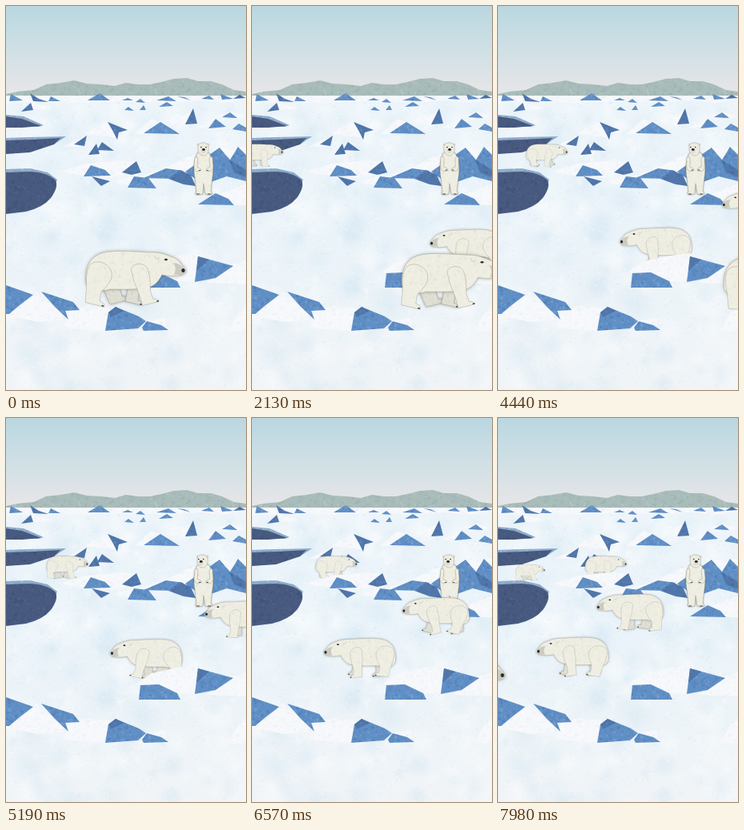
Animation of 300 by 480 pixels, one loop 8 s. Source, as an HTML page with a canvas:

```html
<!DOCTYPE html>
<html lang="en">
<head>
<meta charset="utf-8">
<title>Bears on the ice</title>
<style>
html, body { margin: 0; height: 100%; overflow: hidden; background: #edf3f8; }
canvas { display: block; }
</style>
</head>
<body>
<canvas id="stage" width="300" height="480"></canvas>
<script>
const W = 300, H = 480, LOOP = 8000, STEP = 30, STRIDE = 1060;
const ctx = document.getElementById('stage').getContext('2d');

let seed = 7;
const rand = () => (seed = (seed * 16807) % 2147483647) / 2147483647;

function layer(w = W, h = H) {
  const c = document.createElement('canvas');
  c.width = w;
  c.height = h;
  return c.getContext('2d');
}

// Mottled paper in one colour
function paper(color, light, dark, strength) {
  const g = layer(96, 96);
  g.fillStyle = color;
  g.fillRect(0, 0, 96, 96);
  for (let i = 0; i < 900; i++) {
    g.globalAlpha = strength * rand();
    g.fillStyle = rand() < 0.5 ? light : dark;
    g.beginPath();
    g.ellipse(rand() * 96, rand() * 96, 0.5 + rand() * 2, 0.5 + rand() * 1.4, rand() * 3, 0, 7);
    g.fill();
  }
  return ctx.createPattern(g.canvas, 'repeat');
}

const blue = paper('#608fc5', '#8eb3dc', '#416ca4', 0.35);
const navy = paper('#5076aa', '#7097c6', '#3b5c8c', 0.35);
const white = paper('#f6f8fb', '#ffffff', '#e4eaf2', 0.35);
const water = paper('#485a7f', '#5e7095', '#374869', 0.3);
const rim = paper('#8dabca', '#b9d0e4', '#6f93ba', 0.35);
const rock = paper('#a8bcba', '#c0cdc8', '#8ca5a7', 0.4);
const fur = paper('#efeee3', '#faf9f1', '#d9d6c4', 0.3);
const shadedFur = paper('#e0dfd4', '#efeee5', '#c8c6b8', 0.3);

function fill(g, style, path) {
  g.fillStyle = style;
  g.fill(new Path2D(path));
}

const back = layer(), middle = layer(), near = layer();

function paintBackground(g) {
  const sky = g.createLinearGradient(0, 0, 0, 112);
  sky.addColorStop(0, '#b9d7e1');
  sky.addColorStop(0.5, '#d0e0e5');
  sky.addColorStop(1, '#e8e6e8');
  g.fillStyle = sky;
  g.fillRect(0, 0, W, 113);
  fill(g, rock, 'M0 110L14 107 35 105 50 98 68 96 85 93 101 97 120 98 136 100 150 96 165 98 180 98 194 95 210 91 226 90 240 94 256 94 270 98 285 105 300 107V114H0Z');

  const snow = g.createLinearGradient(0, 112, 0, H);
  snow.addColorStop(0, '#edf5fa');
  snow.addColorStop(0.4, '#e9f3f9');
  snow.addColorStop(1, '#f0f4f7');
  g.fillStyle = snow;
  g.fillRect(0, 112, W, H - 112);
  for (let i = 0; i < 260; i++) {
    const x = rand() * W, y = 125 + rand() * 355, r = 5 + rand() * 20;
    const tone = rand() < 0.55 ? '255,255,255' : '208,228,241';
    const spot = g.createRadialGradient(x, y, 0, x, y, r);
    spot.addColorStop(0, `rgba(${tone},.3)`);
    spot.addColorStop(1, `rgba(${tone},0)`);
    g.fillStyle = spot;
    g.fillRect(x - r, y - r, 2 * r, 2 * r);
  }
  for (let i = 0; i < 2200; i++) {
    g.fillStyle = rand() < 0.5 ? 'rgba(255,255,255,.3)' : 'rgba(190,208,222,.16)';
    g.fillRect(rand() * W, 114 + rand() * 366, 1 + rand() * 2, 1 + rand());
  }

  fill(g, rim, 'M0 136L22 138 47 149 40 151 0 150ZM0 165L28 164 75 163 60 173 0 178ZM0 204L30 203 52 208 64 217 60 226 0 222Z');
  fill(g, water, 'M0 138L20 141 44 150 20 152 0 152ZM0 168L32 167 68 165 60 173 45 178 30 183 0 185ZM0 208L30 207Q52 208 62 218Q66 226 56 240Q46 252 25 257L0 260Z');

  fill(g, white, 'M0 113H300V117L270 121 240 118 205 121 160 119 100 121 60 120 0 121ZM22 131L31 120 60 128ZM98 160L126 145 150 153 140 165ZM160 160L182 141 200 149 214 160ZM205 146L234 131 226 149ZM238 152L262 140 256 154ZM70 176L100 162 97 176ZM260 138L282 132 300 140Z');
  fill(g, blue, 'M102 118L117 109 130 118ZM4 119L6 110 21 118ZM53 119L56 113 68 119ZM145 118L152 115 159 118ZM148 130L153 126 160 131ZM162 120L168 116 174 121ZM167 130L172 124 175 130ZM188 118L203 113 213 119ZM191 126L201 120 209 125ZM214 113L223 114 231 118ZM244 116L254 112 260 117ZM268 110L284 116 270 117ZM172 159L193 145 206 153 217 160ZM253 153L262 141 275 151ZM283 154L291 147 300 152V157ZM270 139L280 133 289 140Z');
  fill(g, navy, 'M30 109L41 116 53 120 34 119ZM19 132L31 121 34 130ZM127 145L152 155 141 158 139 167 134 157ZM224 148L234 128 239 147ZM85 173L101 162 98 175ZM103 186L113 172 117 185ZM114 180L120 170 135 181ZM284 116L292 111 300 115Z');
}

function paintMiddleIce(g) {
  fill(g, white, 'M66 207L100 197 142 193 163 195 148 211 128 215 98 212ZM134 221L160 212 186 217 178 226ZM164 214L200 202 228 188 250 184 230 212ZM255 239L300 222V249H280Z');
  fill(g, blue, 'M97 213L106 199 124 205 131 212ZM152 227L160 213 178 215 188 228ZM172 215L200 203 222 206 210 216ZM224 207L267 177 280 192 290 176 300 179V219L276 213 256 220 238 217ZM240 248L262 234 278 241 285 249Z');
  fill(g, navy, 'M107 213L130 219 119 225ZM145 208L163 194 169 208 157 211ZM203 216L217 205 231 211 237 225 222 223ZM279 192L285 208 300 214V205Z');
  fill(g, white, 'M267 177L283 180 288 179 280 192ZM290 176L300 176V186Z');
}

function paintNearIce(g) {
  fill(g, white, 'M162 333L182 319 215 312 241 309 238 345 214 344 192 334ZM282 323L300 318V348L248 346 262 339ZM277 407L289 386 300 373V407ZM2 387L38 357 80 392 40 395ZM72 402L78 381 104 375 130 378 125 406ZM172 394L198 390 200 400Z');
  fill(g, blue, 'M0 349L34 361 17 374 4 385H0ZM44 357L84 370 92 380 74 381 78 392 61 376ZM137 376L166 388 175 394 165 403 124 406 128 383ZM170 402L176 394 194 399 203 405 172 406ZM240 313L284 325 262 340 236 345ZM168 334L191 333 214 344 218 352 166 352Z');
  fill(g, navy, 'M137 376L147 381 131 389 128 383ZM240 313L254 317 238 331Z');
}

paintBackground(back);
paintMiddleIce(middle);
paintNearIce(near);

// Bear parts: 126 wide and 68 high, facing right
const body = new Path2D('M1 40C-1 18 8 3 30 1C50-1 70 2 86 2C96 2 104 6 112 9C118 12 120 17 124 21C128 25 125 29 121 30C114 32 104 32 96 30C92 38 87 44 78 46C60 49 48 48 32 48C14 52 4 50 1 40Z');
const hindLeg = new Path2D('M-13-7C-6-15 12-12 15 1C17 12 9 19 7 26L8 36Q16 37 15 42H-9C-11 34-11 28-13 20C-16 10-18 1-13-7Z');
const foreLeg = new Path2D('M-10-8C-8-15 7-15 10-5C12 4 9 14 7 24L8 34Q14 35 14 39H-7C-7 28-8 18-10 7Z');

function shape(path, style) {
  ctx.fillStyle = style;
  ctx.fill(path);
  ctx.shadowColor = 'transparent';
  ctx.stroke(path);
}

function dot(x, y, rx, ry, color) {
  ctx.fillStyle = color;
  ctx.beginPath();
  ctx.ellipse(x, y, rx, ry, 0, 0, 7);
  ctx.fill();
}

function leg(path, x, y, length, phase, style) {
  ctx.save();
  ctx.translate(x, y - 1.5 * Math.max(0, Math.cos(phase)));
  ctx.rotate(-0.24 * Math.sin(phase));
  shape(path, style);
  dot(13, length, 1.6, 0.9, '#4b4a49');
  ctx.restore();
}

function bear(noseX, top, size, facing, t, offset = 0) {
  const phase = (t / STRIDE + offset) * 2 * Math.PI - 1.5;
  const shadow = () => { ctx.shadowColor = 'rgba(70,75,80,.45)'; };
  ctx.save();
  ctx.translate(noseX, top);
  ctx.scale(facing * size, size);
  ctx.translate(-126, 0);
  ctx.lineWidth = 0.8;
  ctx.strokeStyle = 'rgba(150,147,130,.5)';
  ctx.shadowBlur = 4 * size;
  shadow();
  leg(hindLeg, 30, 24, 41, phase + Math.PI, shadedFur);
  shadow();
  leg(foreLeg, 66, 27, 38, phase, shadedFur);
  shadow();
  shape(body, fur);
  leg(hindLeg, 19, 26, 41, phase, fur);
  leg(foreLeg, 69, 29, 38, phase + Math.PI, fur);
  fill(ctx, 'rgba(190,188,176,.7)', 'M110 15C115 15 120 18 124 22Q127 28 121 30L111 30Q115 22 110 15Z');
  dot(122.5, 24.5, 2.2, 2.6, '#292b2d');
  dot(101, 11, 2, 1.3, '#292b2d');
  ctx.beginPath();
  ctx.arc(90, 7, 3, 0.4, 3.6);
  ctx.stroke();
  ctx.restore();
}

// Piecewise linear through [time, value] pairs, continued past both ends
function track(t, keys) {
  let i = 1;
  while (i < keys.length - 1 && t > keys[i][0]) i++;
  const [t0, v0] = keys[i - 1], [t1, v1] = keys[i];
  return v0 + (v1 - v0) * (t - t0) / (t1 - t0);
}

const ease = (t, from, to) => {
  const k = Math.min(1, Math.max(0, (t - from) / (to - from)));
  return k * k * (3 - 2 * k);
};

const torso = new Path2D('M240 183C235 190 234 204 236 214L238 232Q235 236 240 236L246 235 247 222 249 235Q253 237 258 235L256 231 258 214C260 204 259 190 253 183Z');
const skull = new Path2D('M240 176C240 169 253 169 253 176C254 182 251 187 247 187C242 187 239 182 240 176Z');
const arm = new Path2D('M-2-1Q1-3 2 1L1 11 6 14Q6 17 2 17Q-3 16-3 11Z');

function standingBear(t) {
  const look = -3.2 * ease(t, 2600, 3300) + 4 * ease(t, 6300, 7000);
  const swing = 0.07 * Math.sin(t / 420);
  ctx.save();
  ctx.lineWidth = 0.6;
  ctx.strokeStyle = 'rgba(140,137,120,.65)';
  ctx.shadowBlur = 2;
  ctx.shadowColor = 'rgba(70,75,80,.5)';
  shape(torso, fur);
  for (const side of [-1, 1]) {
    ctx.save();
    ctx.translate(247 + side * 9, 190);
    ctx.scale(-side, 1);
    ctx.rotate(swing);
    shape(arm, fur);
    dot(4, 15.5, 1.6, 0.6, '#5b5954');
    ctx.restore();
    dot(247 + side * 7, 235, 2.4, 0.8, '#66645f');
  }
  ctx.translate(look * 0.3, 0);
  dot(240.5, 173.5, 2, 2, '#d8d6c9');
  dot(252.5, 173.5, 2, 2, '#d8d6c9');
  shape(skull, fur);
  ctx.translate(look * 0.7, 0);
  dot(247, 181, 3, 3.2, '#dddbd0');
  dot(247, 179.5, 1.9, 1.4, '#242526');
  dot(244, 176.5, 0.8, 0.8, '#242526');
  dot(250, 176.5, 0.8, 0.8, '#242526');
  ctx.restore();
}

function draw(t) {
  ctx.drawImage(back.canvas, 0, 0);
  bear(track(t, [[2130, 39], [7980, 161]]), 172.5, 0.415, 1, t, 0.2);
  bear(track(t, [[7260, 28], [7980, 59]]), track(t, [[7260, 181], [7980, 183]]), 0.294, 1, t, 0.5);
  ctx.drawImage(middle.canvas, 0, 0);
  standingBear(t);
  bear(track(t, [[4440, 280], [5880, 219], [7260, 156], [7980, 123]]),
    track(t, [[4440, 232], [5880, 226], [7260, 223], [7980, 220]]), 0.67, -1, t, 0.3);
  bear(track(t, [[0, 303], [2130, 222], [3450, 183], [4440, 152], [7980, 48]]),
    track(t, [[2130, 279], [7980, 274]]), 0.72, -1, t, 0.1);
  ctx.drawImage(near.canvas, 0, 0);
  bear(225 + 0.0411 * t, 306 + 0.0015 * t, 1, 1, t);
  bear(9 + 0.0411 * (t - 7980), 297, 1, 1, t);
}

function frame(now) {
  draw(Math.floor((now % LOOP) / STEP) * STEP);
  requestAnimationFrame(frame);
}
requestAnimationFrame(frame);
</script>
</body>
</html>
```
